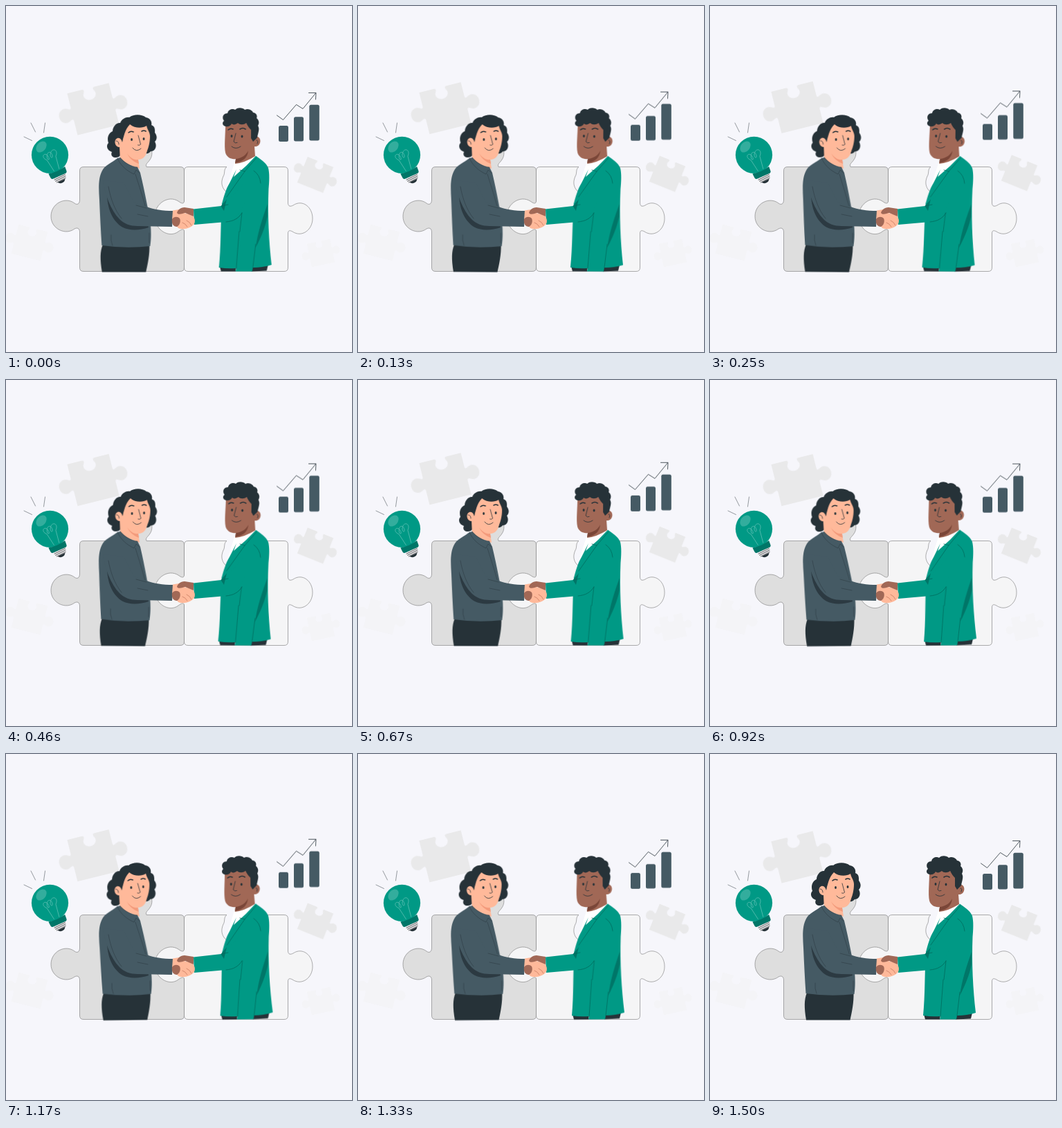
Animation, 500 px wide and 500 px high, one loop 1.54 s. Source, as an HTML page:

```html
<!DOCTYPE html>
<html lang="en">
<head>
<meta charset="utf-8">
<title>Handshake</title>
<style>
html, body { margin: 0; width: 100%; height: 100%; overflow: hidden; background: #f6f6fb; }
svg { display: block; width: 100vw; height: 100vh; }
.dark { fill: #263238; }
.slate { fill: #455a64; }
.green { fill: #009985; }
.skin { fill: #ffb99a; }
.brown { fill: #a16856; }
.line { fill: none; stroke: #263238; stroke-width: .8; stroke-linecap: round; stroke-linejoin: round; }
.brow { stroke-width: 1.6; }
.seam { stroke: #263238; opacity: .55; }
.fold { stroke: #006b5e; }
.sway { animation: sway 770ms cubic-bezier(.37,0,.63,1) -425ms infinite alternate; }
.left { transform-origin: 185px 245px; }
.right { transform-origin: 335px 245px; }
.float { animation: float 1540ms linear infinite; }
@keyframes sway { from { transform: rotate(-.7deg); } to { transform: rotate(.7deg); } }
@keyframes float {
  0%, 97.5%, 100% { transform: translateY(0); }
  16% { transform: translateY(-2.5px); }
  30% { transform: translateY(-4.5px); }
  40%, 44% { transform: translateY(-6.2px); }
  60% { transform: translateY(-4.3px); }
  76% { transform: translateY(-2.3px); }
}
</style>
</head>
<body>
<svg viewBox="0 0 500 500">
  <defs>
    <path id="piece" d="M-31 -31H-10C-4 -31 -8 -26 -9 -23C-10 -11 10 -11 9 -23C8 -26 4 -31 10 -31H31V-10C32 -5 34 -9 40 -10.500C54 -11 54 11 40 10.500C34 9 32 5 31 10V31H-31V10C-32 5 -34 9 -40 10.500C-54 11 -54 -11 -40 -10.500C-34 -9 -32 -5 -31 -10Z"/>
  </defs>

  <!-- background pieces -->
  <g fill="#f4f4f7">
    <use href="#piece" transform="translate(34 342) rotate(14) scale(.7)"/>
    <use href="#piece" transform="translate(455 357) rotate(-12) scale(.55)"/>
  </g>
  <g class="float" fill="#e9e9ea">
    <use href="#piece" transform="translate(126 149) rotate(-14)"/>
    <use href="#piece" transform="translate(447 244) rotate(22) scale(.65)"/>
  </g>

  <!-- interlocked pieces -->
  <g stroke="#777" stroke-width=".6">
    <path fill="#dedede" d="M112 232.500H172C175 229 171 227 168 224C160 213 170 192 187 192C207 192 216 211 208 222C205 227 201 228 203 232.500H252Q257.500 232.500 257.500 238V378Q257.500 383.500 252 383.500H112Q106.500 383.500 106.500 378V326C106 321 103 320 99 322C86 332 65 322 65 304C65 285 86 275 99 285C103 288 106 286 106.500 281V238Q106.500 232.500 112 232.500Z"/>
    <path fill="#f5f5f6" d="M263 232.500H319C314 236 317 242 314 246C311 253 311 259 315 265C323 276 346 274 352 263C356 254 353 246 348 242C344 239 344 235 347 232.500H402Q407.500 232.500 407.500 238V285C408 290 411 290 415 288C428 279 443 290 443 307C443 324 427 335 414 326C410 324 408 324 407.500 328V378Q407.500 383.500 402 383.500H263Q257.500 383.500 257.500 378V325C257 321 253 323 249 326C236 336 215 324 215 304C215 285 235 273 249 282C253 285 257 287 257.500 282V238Q257.500 232.500 263 232.500Z"/>
  </g>

  <!-- chart -->
  <g class="float">
    <g class="slate">
      <rect x="394" y="173" width="14" height="23" rx="2.500"/>
      <rect x="416" y="160.300" width="14" height="35.200" rx="2.500"/>
      <rect x="438.300" y="142.700" width="14.500" height="51.800" rx="2.500"/>
    </g>
    <path class="line" d="M391.500 158L400.500 164.500L419.500 142.500L429 148.500L447.500 126M437.500 125.500L448 125.500L447.500 135"/>
  </g>

  <!-- bulb -->
  <path class="line" stroke-opacity=".8" style="stroke-width:.6" d="M36 169L42.500 182M56.500 169L54.500 183M26 189L37.500 194.500"/>
  <circle class="green" cx="63.500" cy="215.300" r="26.600"/>
  <ellipse cx="51" cy="203.500" rx="6.500" ry="9" transform="rotate(40 51 203.500)" fill="#33ad9d"/>
  <g transform="translate(63.500 215.300) rotate(-24)">
    <path fill="none" stroke="#66c2b6" stroke-width=".7" d="M-4 24L-7 5M4 24L7 5M-7 5C-15 -3 -4 -9 -3 2C-3 8 -7 5 -5 1C-3 -6 4 -6 3 2C1 8 -2 2 2 -2C7 -9 15 -2 7 5"/>
    <path fill="#007668" d="M-13 24Q0 27 13 24L12.500 31Q12 33.500 9 33.500H-9Q-12 33.500 -12.500 31Z"/>
    <path fill="#dcdcdf" d="M-9.500 33.500H9.500L7.500 40.500H-7.500Z"/>
    <path fill="none" stroke="#666" stroke-width=".8" d="M-9 35.500L9 34.500M-8.500 38L8.500 37M-7.500 40.500L7.500 39.500"/>
    <path class="dark" d="M-6 40.500H6Q4 44 0 44Q-4 44 -6 40.500Z"/>
  </g>

  <!-- left man -->
  <g class="sway left">
    <path class="dark" d="M140 345C136 355 136 366 139 384.500H202.500C205 372 208 360 207.500 344Z"/>
    <path class="dark" d="M163 218C156 221 150 217 153 211C146 209 144 202 148 198C145 190 149 183 154 181C154 174 160 168 165 169C167 163 174 160 178 161C184 156 196 156 202 161C209 162 211 168 210 172C216 174 215 180 215 183C219 188 218 193 215 196C219 203 215 210 209 210C207 212 205 214 201 213L192 190Z"/>
    <path class="skin" d="M169 192C171 186 172 178 179 171C186 177 197 177 203 173C204 179 208 182 208 188C208 197 206 204 204 209C202 217 198 222 191 222L193 235L165 224L164 204C157 204 155 193 161 191C165 190 167 194 168 197Z"/>
    <path fill="#f39b7c" d="M175 213C179 219 185 223 191 222L192 228C184 225 178 220 175 213Z"/>
    <path class="line brow" d="M177 183Q180 180 184 182M196 181Q199 179 202 181"/>
    <ellipse class="dark" cx="181.500" cy="193" rx="1.400" ry="2"/>
    <ellipse class="dark" cx="199" cy="192" rx="1.400" ry="2"/>
    <path class="line" d="M191 187L194.500 200Q193 202 190.500 201M183 205Q188 212 195 206"/>
    <path class="line" stroke-width=".6" d="M159 195Q163 195 163 200"/>
    <path class="slate" d="M161 220C152 227 143 230 139 238C133 249 134 264 135 280C136 303 137 324 138.500 346Q174 351 208.500 347C210 337 210 326 209 315C206 297 201 270 194 241L190 233C181 232 171 226 165 219Z"/>
    <path class="line seam" d="M161 220C165 230 174 238 185 243L188 237L193 241M165 219C170 226 180 232 190 233M187 243C193 262 199 280 202 292M152 331Q151 339 154 346M207 328V342"/>
  </g>
  <path fill="#2c3a42" d="M146 270C146 291 153 311 169 320C179 325 194 324 206 320L205 314L176 309C160 302 154 288 146 270Z"/>
  <path class="slate" d="M140 252C143 272 151 295 164 308C171 315 180 318 190 318L240 319L241.500 296C226 296 214 294 203 290L185 284L170 255Z"/>
  <path class="line seam" d="M148 261C151 278 157 295 167 307M188 288L203 292M190 301L205 304"/>

  <!-- right man -->
  <g class="sway right">
    <path class="dark" d="M309 376L333 377L332 383.500H311ZM355 375L379 374L377 382.500L355 383.500Z"/>
    <path fill="#fff" d="M331 224L359 215L364 221L345 238L327 250L319 262Z"/>
    <path class="brown" d="M317 170C317 187 315 202 317 212C319 219 326 222 332 221L331 228Q344 227 360 217L359 203C368 204 370 192 364 189C360 188 358 191 357 195L355 171L333 166Z"/>
    <path fill="#7a4638" d="M332 221C341 220 347 215 350 209C349 219 343 225 331 227Z"/>
    <path class="dark" d="M317 174C312 173 312 168 315 166C311 161 314 155 320 155C321 149 328 148 331 150C335 146 342 147 345 150C350 147 356 151 357 154C363 155 363 160 362 162C367 166 365 171 364 173C367 178 364 183 363 190L357 196L354 191V179C351 176 349 173 347 169C343 172 338 172 335 169C331 172 328 172 326 170C324 174 320 175 317 174Z"/>
    <path class="line brow" d="M321 179Q324 176 328 178M338 178Q342 175 346 178"/>
    <ellipse class="dark" cx="326" cy="188" rx="1.400" ry="2"/>
    <ellipse class="dark" cx="341" cy="188.500" rx="1.400" ry="2"/>
    <path class="line" d="M332 184L329 196Q331 199 334 197.500M326 203Q332 208 339 203M362 194Q365 194 363 199"/>
    <path class="green" d="M361 216.500C367 221 376 226 379 234C381 242 380.500 254 379.500 264C378 302 380 340 384 374Q371 378 357 378L356 383.500H332L333 379Q320 380 308 378C311 348 310 318 312 286C315 275 318 264 323 256L333 236L329 247L347 231Z"/>
    <path fill="#007668" d="M378 286C371 306 364 326 361 349C368 336 375 319 378 304Z"/>
    <path class="line fold" d="M362 219L345 239L319 276M345 239L338 237M358 238Q367 244 368 256M337 326L333 379M361 344L357 378M341 299L338 326"/>
  </g>
  <path class="green" d="M322 280L311 289L271 293.500L272 316L318 312C332 309 342 296 346 280L345 255Z"/>
  <path fill="#007668" d="M311 290C313 284 316 284 319 279L315 296Z"/>
  <path class="line fold" d="M341 299C336 307 329 311 318 312M311 289L321 287"/>

  <!-- hands -->
  <path class="skin" d="M241 295.500L250 294C254 299 260 300 267 301C273 304 274 311 272 315C267 321 257 324 249 321L240 310Z"/>
  <path class="brown" d="M271 293L258 291C252 291 248 295 247 299C250 303 256 299 259 299L271 304Z"/>
  <path class="brown" d="M240 308C243 304 248 304 251 307C253 311 251 317 247 319C242 319 239 315 240 308Z"/>
  <path class="line" stroke-width=".5" style="stroke:#c87c62" d="M255 313Q259 314 262 319M261 310Q266 312 268 317"/>
</svg>
</body>
</html>
```
